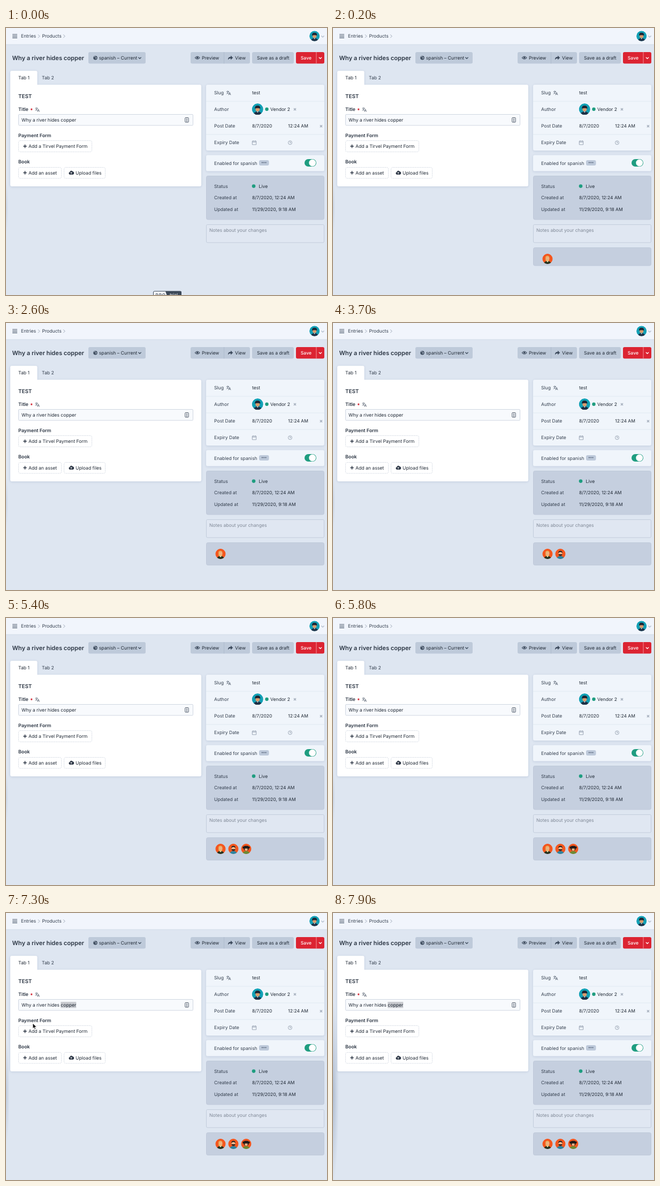
An HTML page for the animation above (8 s loop, 600 by 499 pixels).

```html
<!DOCTYPE html>
<html lang="en">
<head>
<meta charset="utf-8">
<title>Entry editor</title>
<style>
  html, body { margin: 0; width: 100%; height: 100%; overflow: hidden; background: #dee6f1; }
  svg { display: block; width: 600px; height: 499px; }
  text { font: 400 8.65px Inter, Roboto, sans-serif; fill: #333e4d; text-rendering: geometricPrecision; white-space: pre; }
  .bold { font-weight: 600; fill: #2c3644; }
  .dark { fill: #1f2834; }
  .stamp { fill: #1f2834; font-size: 8.5px; }
  .line { fill: none; stroke: #3f4d5f; stroke-width: 1.1; }
  .soft { fill: none; stroke: #929dad; stroke-width: .9; }
  .dash { fill: #fff; stroke: #d3d9e2; stroke-dasharray: 2 1.2; }
  .card { filter: drop-shadow(0 1px 2px #6078a038); }
</style>
</head>
<body>
<svg viewBox="0 0 600 499" id="stage"></svg>
<script>
const LOOP = 8000;
const TITLE = 'Why a river hides copper';
const WORD_START = TITLE.lastIndexOf(' ') + 1;

const text = (x, y, s, attrs = '') => `<text x="${x}" y="${y}" ${attrs}>${s}</text>`;
const bold = (x, y, s, size = 8.85) => text(x, y, s, `class="bold" style="font-size:${size}px"`);
const dark = (x, y, s) => text(x, y, s, 'class="dark"');
const stamp = (x, y, s) => text(x, y, s, 'class="stamp"');
const box = (x, y, w, h, fill, r = 3, attrs = '') =>
  `<rect x="${x}" y="${y}" width="${w}" height="${h}" rx="${r}" fill="${fill}" ${attrs}/>`;
const dot = (x, y, r, fill) => `<circle cx="${x}" cy="${y}" r="${r}" fill="${fill}"/>`;
const path = (d, attrs = 'class="line"') => `<path d="${d}" ${attrs}/>`;
const at = (x, y, content) => `<g transform="translate(${x} ${y})">${content}</g>`;

const chevronRight = (x, y) => path(`M${x - 1.5} ${y - 3}l3 3l-3 3`, 'class="soft"');
const chevronDown = (x, y, color) =>
  path(`M${x - 2.6} ${y - 1.3}l2.6 2.6l2.6-2.6`, `fill="none" stroke="${color}" stroke-width="1.3"`);
const plus = (x, y) => path(`M${x - 3.2} ${y}h6.4M${x} ${y - 3.2}v6.4`, 'stroke="#2d3746" stroke-width="1.5"');
const cross = (x, y) => path(`M${x - 2} ${y - 2}l4 4m0-4l-4 4`, 'stroke="#a5afbd" stroke-width="1.6"');
const translateIcon = (x, y) => at(x, y,
  path('M-4-2.6h5M-1.5-4v1.4M.2-2.6Q-1 .8-3.8 2M-3-1.4Q-1.8.8 0 1.6M0 4l2-5l2 5M.8 2.4h2.5',
    'fill="none" stroke="#556171" stroke-width=".85"'));

// Small cartoon portraits inside a disc
const shoulders = fill => path('M-7 10Q-6.5 4 0 4T7 10z', `fill="${fill}"`);
const portraits = {
  cap: ['#12a0b5', shoulders('#1d3147') + path('M-1.2 4h2.4L0 6.5z', 'fill="#dfe7ec"') +
    dot(0, .2, 3.7, '#d99a6c') + path('M-4.8-.8Q-5.4-6.4 0-6.4T4.8-.8Q0-2.8-4.8-.8z', 'fill="#1c2736"')],
  blonde: ['#f4571f', box(-4, -6, 7.5, 10.5, '#e9b05c', 3.7) + shoulders('#26331f') +
    path('M-2.4 3.6h4.8L0 6.8z', 'fill="#f3d9a8"') + dot(.5, -.8, 3, '#eeb183')],
  beard: ['#f4571f', shoulders('#2d84a0') + dot(0, -.8, 3.7, '#f0bd93') +
    path('M-3.8-1.2Q-4.5-6 0-6T3.8-1.2Q2.5-3.5 0-3.5T-3.8-1.2z', 'fill="#2b2623"') +
    path('M-3.6 0Q0 1.2 3.6 0Q3.4 4 0 4T-3.6 0z', 'fill="#3a2a24"')],
  buns: ['#f4571f', box(-6.8, -4.6, 13.6, 3.8, '#211a18', 1) + box(-4.6, -6, 9.2, 9, '#211a18', 2.5) +
    shoulders('#6d8a35') + dot(0, .8, 2.8, '#eab183') + box(-3.2, -3, 6.4, 2.2, '#211a18', 0)]
};
const avatar = (x, y, r, name) => {
  const [back, figure] = portraits[name];
  return `<g transform="translate(${x} ${y}) scale(${r / 10})" clip-path="url(#disc)">${dot(0, 0, 10, back)}${figure}</g>`;
};

const header = box(0, 0, 600, 31, '#f1f5fc', 0) + box(0, 30.5, 600, 1, '#d2dbe8', 0) +
  path('M12 12h9M12 15.2h9M12 18.4h9', 'stroke="#3f4d5f" stroke-width="1.2"') +
  text(28, 18.2, 'Entries') + chevronRight(61.5, 15.3) +
  text(67.5, 18.2, 'Products') + chevronRight(108.7, 15.3) +
  avatar(576.7, 15, 9.7, 'cap') + chevronDown(592, 15.8, '#b3bdcb');

const BUTTON = '#becada';
const toolbar = bold(11.5, 59.6, TITLE, 11.15) +
  box(154, 45, 107, 21.5, BUTTON) + dot(167, 55.8, 3.8, '#3f4d5f') +
  path('M164.5 54q2-2 3 0t2 2q-2 2-3 0', 'fill="none" stroke="#becada" stroke-width="1"') +
  dark(173.8, 58.8, 'spanish – Current') + chevronDown(250, 56, '#3f4d5f') +
  box(345, 45, 111, 21.5, BUTTON) + box(407, 45, 1, 21.5, '#aebccd', 0) +
  path('M353.4 55.6Q357.7 50.4 362 55.6Q357.7 60.8 353.4 55.6z') + dot(357.7, 55.4, 1.8, '#3f4d5f') +
  dark(366, 58.8, 'Preview') +
  path('M415 59.5Q414.5 53.8 420 54v-2.5l4.2 4l-4.2 4v-2.6Q416.5 56.5 415 59.5z', 'fill="#3f4d5f"') +
  dark(428, 58.8, 'View') +
  box(460, 45, 78, 21.5, BUTTON) + dark(469, 58.8, 'Save as a draft') +
  box(542, 45, 53, 21.5, '#dc2432') + box(579.5, 45, 1, 21.5, '#f0919a', 0) +
  text(550.8, 58.8, 'Save', 'style="fill:#fff;font-weight:500"') + chevronDown(587.5, 56, '#fff');

const form = `<g class="card">${box(8, 80, 50.5, 32, '#fff')}${box(8, 106, 357, 190, '#fff')}</g>` +
  dark(23, 96, 'Tab 1') + text(67, 96, 'Tab 2') +
  bold(23, 130.5, 'TEST', 9.9) +
  bold(23, 154.8, 'Title') +
  path('M47.7 150v4M46 151l3.4 2M49.4 151l-3.4 2', 'stroke="#d5303c" stroke-width="1"') + translateIcon(58.5, 152.5) +
  box(23.5, 161.5, 326, 20.5, '#f8fafd', 1.5, 'stroke="#cfd6e1"') +
  '<rect id="selection" y="166" height="11.5" fill="#c9cbd0"/>' + text(29, 174.8, TITLE, 'id="field" class="dark"') +
  box(334.8, 167.5, 6.4, 8.6, 'none', 1, 'stroke="#4b5665"') +
  path('M338 169.3v1.3m0 1v1.3m0 1v1', 'stroke="#4b5665" stroke-width="1.8"') +
  bold(23, 204, 'Payment Form') +
  box(23.5, 210.5, 137, 21, '#fff', 3, 'class="dash"') + plus(35.5, 221) + dark(42, 224, 'Add a Tirvel Payment Form') +
  bold(23, 253, 'Book') +
  box(23.5, 260.5, 80, 20.5, '#fff', 3, 'class="dash"') + plus(35.5, 270.5) + dark(42, 273.5, 'Add an asset') +
  box(108.5, 260.5, 77, 20.5, '#fff', 3, 'class="dash"') +
  path('M119.5 274a2.4 2.4 0 0 1-.3-4.7a3 3 0 0 1 5.6-1a2.9 2.9 0 0 1 .2 5.7z', 'fill="#2d3746"') +
  path('M122 273v-3.4m-1.6 1.4l1.6-1.6l1.6 1.6', 'fill="none" stroke="#fff" stroke-width=".9"') +
  dark(130, 273.5, 'Upload files');

const PALE = '#f0f5fb', STEEL = '#c5cfdf';
const details = `<g class="card">${box(374, 106, 221, 123, PALE)}${box(374, 237.5, 221, 30, PALE)}</g>` +
  [136.5, 167.5, 198.5].map(y => box(374, y, 221, 1, '#e2e9f2', 0)).join('') +
  text(389, 123.8, 'Slug') + translateIcon(416, 121.3) + dark(460, 123.8, 'test') +
  text(389, 154.8, 'Author') + avatar(470.3, 151.7, 10.6, 'cap') + dot(487.5, 151.8, 3.2, '#1f9d80') +
  dark(494, 154.8, 'Vendor 2') + cross(540, 152) +
  text(389, 185.6, 'Post Date') + stamp(460, 185.6, '8/7/2020') + stamp(527.3, 185.6, '12:24 AM') + cross(589, 183.5) +
  text(389, 216.7, 'Expiry Date') +
  path('M460.3 211.5h7.4v6.5h-7.4zM460.3 213.3h7.4M462 210v1.5M466 210v1.5', 'class="soft"') +
  path('M534.5 214.3a3.5 3.5 0 1 0-7 0a3.5 3.5 0 1 0 7 0M531 212v2.5h1.8', 'class="soft"') +
  text(389, 255.5, 'Enabled for spanish') + box(473, 247, 18.5, 10, '#bdc9da') +
  [478.9, 482.2, 485.5].map(x => dot(x, 251.6, 1, '#46546a')).join('') +
  box(558, 245, 22, 14, '#1f9d80', 7) + dot(572.7, 252, 6.4, '#fff') +
  box(374.5, 276.5, 220, 81.5, STEEL, 3, 'stroke="#bfc9da"') +
  text(389, 298.8, 'Status') + dot(463, 295.6, 3.3, '#1f9d80') + dark(472.5, 298.8, 'Live') +
  text(389, 320.2, 'Created at') + stamp(460, 320.2, '8/7/2020, 12:24 AM') +
  text(389, 341.6, 'Updated at') + stamp(460, 341.6, '11/29/2020, 9:18 AM') +
  box(374.5, 367.5, 220, 33.5, '#e0e7f2', 2, 'stroke="#c2ccdb"') +
  text(380, 380.8, 'Notes about your changes', 'style="fill:#7f8896"');

const activity = box(374.5, 410.5, 220, 42, STEEL, 3, 'id="panel" stroke="#bfc9da"') +
  ['blonde', 'beard', 'buns'].map((name, i) => `<g id="visitor${i}">${avatar(401 + 24 * i, 431.5, 9.7, name)}</g>`).join('');

const badge = `<g id="badge">${box(275.5, 492, 52, 13, '#f4f6fa', 2, 'stroke="#3c4858"')}` +
  path('M298 492h29.5v13h-25z', 'fill="#3c4858"') +
  text(279.5, 502, 'PRO', 'style="font-size:8px;font-weight:500;letter-spacing:1px"') +
  text(306, 502, 'trial', 'style="fill:#fff"') + '</g>';

const stage = document.getElementById('stage');
stage.innerHTML = `<defs>
    <clipPath id="disc"><circle r="10"/></clipPath>
    <radialGradient id="shade"><stop stop-color="#8fa0ba" stop-opacity=".6"/><stop offset="1" stop-color="#8fa0ba" stop-opacity="0"/></radialGradient>
  </defs>` + box(0, 0, 600, 499, '#dee6f1', 0) + header + toolbar + form + details + activity + badge +
  '<ellipse id="edge" cx="0" cy="335" fill="url(#shade)"/>' +
  path('M0 0v10l2.3-2.1l1.6 3.6l1.7-.8l-1.6-3.4h3.2z', 'id="cursor" fill="#111" stroke="#fff" stroke-width=".8"');

const el = Object.fromEntries([...stage.querySelectorAll('[id]')].map(node => [node.id, node]));
const set = (node, attrs) => Object.entries(attrs).forEach(([k, v]) => node.setAttribute(k, v));
const show = (node, visible) => node.style.display = visible ? '' : 'none';
const clamp = v => Math.min(1, Math.max(0, v));

// Pointer enters from the left, picks the last word and leaves again: [time, x, y]
const pointer = [[6500, 70, 190], [6600, 152, 167], [6700, 128, 169], [6900, 118, 170], [7100, 112, 172], [7500, -12, 240]];

function pointerAt(t) {
  const i = pointer.findIndex(p => p[0] > t);
  if (i < 1) return null;
  const [t0, x0, y0] = pointer[i - 1], [t1, x1, y1] = pointer[i];
  const k = (t - t0) / (t1 - t0);
  return [x0 + (x1 - x0) * k, y0 + (y1 - y0) * k];
}

function draw(now) {
  const t = Math.floor(now % LOOP / 100) * 100;

  const open = t < 100 ? 0 : t < 200 ? .12 : t < 400 ? .8 : 1;
  show(el.panel, open > 0);
  set(el.panel, { height: 42 * open });
  set(el.badge, { transform: `translate(0 ${43 * open})` });
  show(el.visitor0, open > .5);
  show(el.visitor1, t >= 2900);
  show(el.visitor2, t >= 5400);

  const spot = pointerAt(t);
  show(el.cursor, spot);
  if (spot) set(el.cursor, { transform: `translate(${spot})` });

  const left = el.field.getStartPositionOfChar(WORD_START).x;
  const right = el.field.getEndPositionOfChar(TITLE.length - 1).x;
  set(el.selection, { x: left, width: right - left });
  show(el.selection, t >= 6900);

  const grow = clamp((t - 7100) / 500);
  set(el.edge, { rx: 4 + 7 * grow, ry: 50 + 120 * grow, opacity: .45 + .5 * grow });

  requestAnimationFrame(() => draw(performance.now() - start));
}
const start = performance.now();
draw(0);
</script>
</body>
</html>
```
